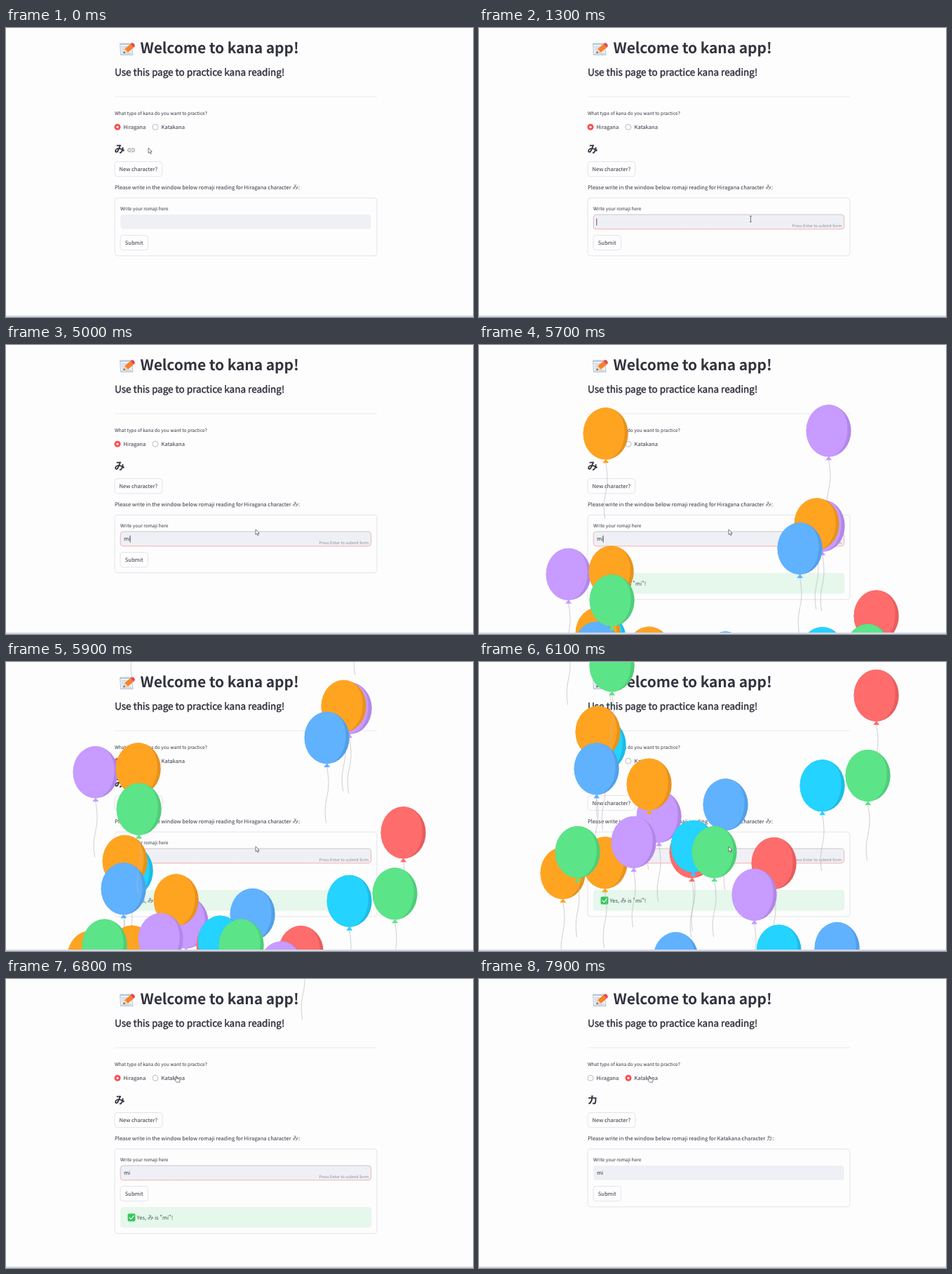
Recreate the animation shown at these times as an HTML page. Size 666 px wide and 412 px high, loop 8000 ms.

```html
<!DOCTYPE html>
<html lang="ja">
<head>
<meta charset="utf-8">
<title>Kana practice</title>
<style>
html, body { margin: 0; width: 100%; height: 100%; overflow: hidden; background: #fefdfe; }
svg { display: block; width: 666px; height: 412px; }
text {
  font: 7.6px "Noto Sans CJK JP", "Noto Sans CJK SC", "Noto Sans CJK", "Noto Sans", sans-serif;
  fill: #31333f; text-rendering: geometricPrecision; white-space: pre;
}
.title { font-size: 21.03px; font-weight: 700; letter-spacing: -.105px; }
.subtitle { font-size: 13.52px; stroke: #31333f; stroke-width: .45px; }
.label { font-size: 6.62px; }
.hint { font-size: 5.71px; fill: #8b8d97; text-anchor: end; }
.kana { font-size: 15px; font-weight: 700; }
.inline { font-size: 8.5px; fill: #555763; }
.box { fill: none; stroke: #dcdde2; stroke-width: .8; }
.thin { fill: none; stroke-linecap: round; }
</style>
</head>
<body>
<svg viewBox="0 0 666 412">
  <defs>
    <linearGradient id="focusLine" x2="0" y2="1">
      <stop stop-color="#c4b8c0"/><stop offset="1" stop-color="#f99a9a"/>
    </linearGradient>
  </defs>

  <g id="memo">
    <path d="M162 21.5h17.5l2 17.5h-18.5z" fill="#b9c9d9"/>
    <path d="M163.3 24h15.5l1.3 13.6h-16z" fill="#f1f4f8"/>
    <path class="thin" d="M165 27h10M165.3 30h8M165.6 33h5M166 36h12" stroke="#a9b7c6" stroke-width=".9"/>
    <path d="M167.4 36l2-6.2 4.6 5z" fill="#f6cfa2"/>
    <path d="M167.4 36l.8-2.6 1.8 1.9z" fill="#333"/>
    <path d="M169.4 29.8l8-6.8 4.6 5-8 6.8z" fill="#f9802b"/>
    <path d="M177.4 23l2.2-1.8q3.2-.2 4.4 4.4l-2 2.4z" fill="#e4484c"/>
  </g>
  <text class="title" x="191.6" y="35.6">Welcome to kana app!</text>
  <text class="subtitle" x="155" y="68">Use this page to practice kana reading!</text>
  <path d="M155 98h374" stroke="#e2e2e7" stroke-width=".8"/>

  <text class="label" x="155" y="123.8">What type of kana do you want to practice?</text>
  <circle class="box" cx="159" cy="141.2" r="4" style="stroke:#a8aab3"/>
  <circle class="box" cx="213" cy="141.2" r="4" style="stroke:#a8aab3"/>
  <g id="radio"><circle cx="159" cy="141.2" r="4.4" fill="#ff4b4b"/><circle cx="159" cy="141.2" r="1.6" fill="#fff"/></g>
  <text x="167.3" y="144.2">Hiragana</text>
  <text x="221.6" y="144.2">Katakana</text>

  <text class="kana" id="kana" x="154.6" y="178"></text>
  <path id="link" class="thin" stroke="#83858f" stroke-width="1" d="M177.5 171.7h-1.4a2.4 2.4 0 0 0 0 4.8h1.4M179.6 171.7h1.4a2.4 2.4 0 0 1 0 4.8h-1.4M176.6 174.1h3.9"/>
  <rect class="box" x="155" y="190.5" width="67.8" height="21.2" rx="4"/>
  <text x="161.4" y="203.9">New character?</text>
  <text x="155" y="229.8">Please write in the window below romaji reading for <tspan id="kind"></tspan> character <tspan class="inline" id="sign"></tspan>:</text>

  <rect class="box" id="form" x="155" y="242.3" width="374" height="82.5" rx="4"/>
  <text class="label" x="163" y="259.6">Write your romaji here</text>
  <rect id="input" x="163.2" y="266" width="357.4" height="20.8" rx="4" fill="#eff0f5" stroke-width=".8"/>
  <text id="typed" x="168" y="279"></text>
  <path id="caret" stroke="#31333f" stroke-width=".8"/>
  <text class="hint" id="hint" x="517" y="283.8">Press Enter to submit form</text>
  <rect class="box" x="163" y="295.5" width="39.5" height="21.2" rx="4"/>
  <text x="169.8" y="308.9">Submit</text>

  <g id="success">
    <rect x="163" y="325" width="358" height="29.6" rx="4" fill="#e6f7ec"/>
    <rect x="173.6" y="334.6" width="10.8" height="10.8" rx="1.6" fill="#35c759"/>
    <path class="thin" d="M176 340.2l2.2 2.2 4-4.8" stroke="#fff" stroke-width="1.2"/>
    <text x="186.5" y="343" style="fill:#3c5546">Yes, <tspan class="inline">み</tspan> is "mi"!</text>
  </g>

  <g id="balloons"></g>
  <path d="M0 411h666" stroke="#d0d5e6" stroke-width="2"/>
  <g id="cursor" stroke="#44464e" stroke-width=".7" stroke-linejoin="round">
    <path id="arrow" fill="#fff" d="M0 0v7.3l1.7-1.5 1.2 2.7 1.3-.6-1.2-2.6h2.2z"/>
    <path id="beam" fill="none" d="M-1.6-4.3q1.6 0 1.6 1v6.6q0 1-1.6 1M1.6-4.3q-1.6 0-1.6 1M0 3.3q0 1 1.6 1"/>
    <path id="hand" fill="#fff" d="M-.8.8q.8-1.4 1.6 0v3l3.6.8q.9.3.7 1.4l-.6 3.2h-4.2l-2.8-3.6q.3-1.2 1.7.1z"/>
  </g>
</svg>
<script>
const LOOP = 8000, RISE = 750;
const SUBMIT = 5100, PICK = 7200, RELOAD = 7400;
const el = id => document.getElementById(id);
const show = (id, on) => el(id).setAttribute('visibility', on ? 'visible' : 'hidden');

const tints = {
  orange: ['#ffa421', '#e8921c'], purple: ['#c79bff', '#b187e8'], blue: ['#60b2ff', '#539fe8'],
  green: ['#5ce488', '#4fce78'], cyan: ['#24d3ff', '#1cbce6'], red: ['#ff6c6c', '#e65d5f']
};
// Colour, centre x, launch time; listed back to front.
const balloons = [
  ['purple', 498, 5165], ['orange', 180, 5169], ['purple', 489, 5311], ['orange', 481, 5308],
  ['blue', 457, 5351], ['purple', 127, 5400], ['orange', 188, 5395], ['cyan', 177, 5561],
  ['orange', 169, 5543], ['blue', 167, 5595], ['green', 189, 5456], ['purple', 256, 5668],
  ['orange', 242, 5618], ['orange', 179, 5746], ['purple', 220, 5710], ['orange', 119, 5765],
  ['green', 140, 5727], ['blue', 351, 5649], ['red', 303, 5727], ['cyan', 305, 5717],
  ['green', 335, 5727], ['red', 420, 5747], ['purple', 392, 5807], ['cyan', 489, 5620],
  ['red', 566, 5494], ['green', 554, 5605], ['blue', 280, 5969], ['cyan', 427, 5944],
  ['blue', 510, 5936], ['cyan', 423, 6097]
];
el('balloons').innerHTML = balloons.map(([tint]) => {
  const [light, dark] = tints[tint];
  return `<g><path class="thin" d="M0 79c4 22 2 32 0 42s-4 22-1 37" stroke="#b9b9bd" stroke-width=".7"/>
    <path d="M0 73l4.4 6h-8.8z" fill="${light}"/>
    <ellipse cy="37" rx="32" ry="37" fill="${dark}"/>
    <path d="M4 .3A32 37 0 1 0 3 73.8C18 70 27 54 27 34C27 16 18 3 4 .3z" fill="${light}"/></g>`;
}).join('');
const balloonNodes = [...el('balloons').children];

// cubic-bezier(.42, 0, 1, 1)
function easeIn(x) {
  let lo = 0, hi = 1;
  for (let i = 0; i < 20; i++) {
    const s = (lo + hi) / 2;
    if (s * (1.26 + s * (.48 - .74 * s)) < x) lo = s; else hi = s;
  }
  return lo * lo * (3 - 2 * lo);
}

const path = [
  [100, 203, 171], [900, 385, 276], [1200, 385, 276], [1800, 418, 227], [2200, 418, 227],
  [2600, 405, 227], [3000, 405, 227], [3800, 356, 263], [6150, 356, 263], [6400, 285, 226], [6800, 243, 138]
];
function pointer(t) {
  const next = path.findIndex(p => p[0] > t);
  if (next < 1) return path.at(next).slice(1);
  const [t0, x0, y0] = path[next - 1], [t1, x1, y1] = path[next];
  const u = (t - t0) / (t1 - t0), e = u * u * (3 - 2 * u);
  return [x0 + (x1 - x0) * e, y0 + (y1 - y0) * e];
}

function drawPointer(t) {
  const [x, y] = pointer(t);
  const within = (l, top, r, bottom) => x > l && x < r && y > top && y < bottom;
  const beam = within(163, 266, 521, 287) || within(155, 221, 422, 233);
  const hand = within(207, 135, 257, 147);
  el('cursor').setAttribute('transform', `translate(${x} ${y})`);
  show('beam', beam);
  show('hand', hand);
  show('arrow', !beam && !hand);
  show('link', within(155, 163, 529, 184));
}

function draw(t) {
  const katakana = t >= RELOAD, focused = t >= 1200 && t < PICK;
  el('kana').textContent = el('sign').textContent = katakana ? 'カ' : 'み';
  el('kind').textContent = katakana ? 'Katakana' : 'Hiragana';
  el('radio').setAttribute('transform', `translate(${t >= PICK ? 54 : 0} 0)`);

  const typed = t < 3900 ? '' : t < 4200 ? 'm' : 'mi';
  const caretX = 167.8 + [0, 7.2, 9.3][typed.length];
  el('typed').textContent = typed;
  el('caret').setAttribute('d', `M${caretX} 271.5v10`);
  show('caret', focused && (t < 3900 ? Math.floor((t - 1200) / 530) % 2 === 0 : t < 5900));
  el('input').setAttribute('stroke', focused ? 'url(#focusLine)' : 'none');
  show('hint', focused);

  const success = t >= SUBMIT && !katakana;
  show('success', success);
  el('form').setAttribute('height', success ? 120.6 : 82.5);

  balloons.forEach(([, x, start], i) => {
    const u = (t - start) / RISE, node = balloonNodes[i];
    node.style.display = u > 0 && u < 1 ? '' : 'none';
    node.setAttribute('transform', `translate(${x + .7} ${413.2 - 571 * easeIn(u)})`);
  });
  drawPointer(t);
}

const began = performance.now();
function tick() {
  draw((performance.now() - began) % LOOP);
  requestAnimationFrame(tick);
}
tick();
</script>
</body>
</html>
```
